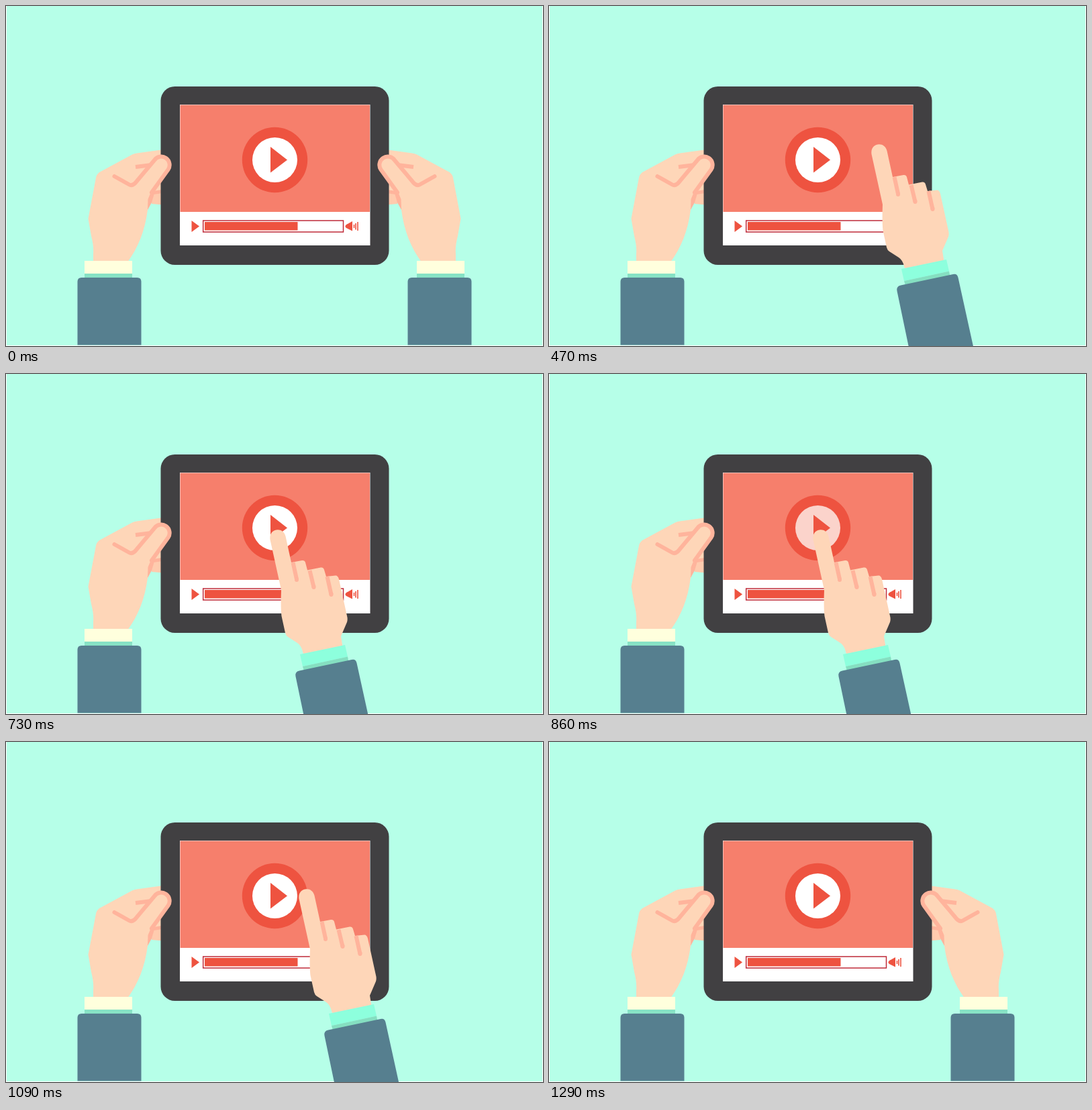
Recreate the animation shown at these times as an HTML page. Size 800 by 507 pixels, loop 1460 ms.

```html
<!DOCTYPE html>
<html lang="en">
<head>
<meta charset="utf-8">
<title>Tablet tap</title>
<style>
  html, body { margin: 0; width: 100%; height: 100%; overflow: hidden; background: #fff; }
  svg { display: block; width: 100%; height: 100%; }
  .skin { fill: #fed6b8; }
  .crease { fill: none; stroke: #ffb49c; stroke-width: 6; stroke-linecap: round; stroke-linejoin: round; }
  .sleeve { fill: #567f8f; }
  .red { fill: #ee5340; }
  #tap { visibility: hidden; }
</style>
</head>
<body>
<svg viewBox="0 0 800 507">
  <defs>
    <g id="palm">
      <path fill="#ffcbae" d="M212 268 H240 V297 L217 295 Z"/>
      <path class="skin" d="M130 382 L130 370 Q131 358 127 343 L122.500 317 L134 256 Q135 251 139 248 L188 221.500 Q191 220 195 219.500 L231 214.500 H240 V270 L217 280 L211 304 C207 335 197 360 181 382 Z"/>
      <path class="crease" stroke-width="5" style="stroke-linecap:butt" d="M193 240 L217 237"/>
      <path class="crease" style="stroke-width:5;stroke-linecap:butt" d="M216 279 L236 276"/>
      <path fill="#ffb49c" d="M219 270 L211.500 288 L211 304 L217 293 L222 276 Z"/>
      <path fill="#ffffdd" d="M117 380 H188 V399 H117 Z"/>
      <path fill="#87e2c5" d="M117 399 H188 V405 H117 Z"/>
      <path class="sleeve" d="M106.500 505.500 V411 Q106.500 405 112.500 405 H195.500 Q201.500 405 201.500 411 V505.500 Z"/>
    </g>
    <g id="thumb">
      <path class="skin" d="M187 268 L221 230 A11 11 0 0 1 242 244 L217 276 L205 290 Z"/>
      <path class="crease" d="M161.500 254 L183 266 Q189 269.500 195 261 L221 230 A11 11 0 0 1 241.500 244 L217 278"/>
    </g>
  </defs>

  <rect x="1" width="798" height="506" fill="#b6ffe8"/>
  <use href="#palm"/>
  <g class="grip"><use href="#palm" transform="matrix(-1 0 0 1 800 0)"/></g>

  <rect x="230.500" y="120" width="340" height="266" rx="21" fill="#414042"/>
  <rect x="259" y="147" width="283.500" height="210" fill="#fff"/>
  <rect x="259.500" y="147.500" width="282.500" height="159.500" fill="#f67f6c"/>
  <circle class="red" cx="400.500" cy="229.500" r="48.700"/>
  <circle id="dot" cx="400.500" cy="229.500" r="33.500" fill="#fff"/>
  <path class="red" d="M394 210 L419 229.500 L394 248.500 Z"/>

  <path class="red" d="M276.500 320 L288 328.500 L276.500 337 Z"/>
  <rect x="293.700" y="320" width="208.800" height="17" fill="#fff" stroke="#bf2a38" stroke-width="1.500"/>
  <rect class="red" x="296" y="322" width="138.500" height="12.500"/>
  <path class="red" d="M505.500 328.500 Q505.500 327 507 326 L516 321 V335.500 L507 331 Q505.500 330 505.500 328.500 Z"/>
  <path d="M518.500 326 V331 M521 324 V333.500 M524 322 V335" stroke="#ee5340" stroke-width="1.600"/>

  <use href="#thumb"/>
  <g class="grip"><use href="#thumb" transform="matrix(-1 0 0 1 800 0)"/></g>

  <g id="tap">
    <path class="skin" d="M526.500 199 C524 182 546 179 549.500 194 L558 233 L574 230 Q578 229.500 579 233 L582 244.500 L602 240.500 Q606 240 607 244 L610 254 L624 252.500 Q627.500 252.500 629 258 L641.500 315 Q642 319 641 322 L632 343 L635 362 L577 372 L575 366 Q573 357 567 353 L553 344 Q550 342 549 338 L543.500 313 Q542 300 543 274 Z"/>
    <path class="crease" style="stroke-linecap:butt" d="M560.500 233 L566 258 M585.500 245 L591.500 270 M611.500 254 L617.500 281"/>
    <path class="crease" d="M566 258 V259 M591.500 269 V270 M617.500 280 V281"/>
    <path fill="#8dffdd" d="M571 370 L638 356 L642 373.500 L575 388 Z"/>
    <path fill="#85dfc1" d="M575 388 L642 373.500 L643.500 381 L577 395 Z"/>
    <path class="sleeve" d="M564.500 403 Q563 396 570 394.500 L648 378 Q654 376.500 655.500 383 L691.500 547 H594.500 Z"/>
  </g>
</svg>
<script>
const LOOP = 1460;

// Steps: start time, hand offset [x, y] or null while both hands hold the tablet, pressed
const steps = [
  [0, null],
  [330, [0, 0]],
  [470, [-46, 22]],
  [600, [-90, 35]],
  [730, [-133, 48]],
  [860, [-133, 48], true],
  [990, [-133, 48]],
  [1090, [-90, 35]],
  [1190, [-46, 22]],
  [1290, null]
];

const show = on => on ? 'visible' : 'hidden';

function play(el, pose) {
  const frames = steps.map(([at, pos, down]) =>
    ({ offset: at / LOOP, easing: 'step-end', ...pose(pos, down) }));
  frames.push({ ...frames[frames.length - 1], offset: 1 });
  el.animate(frames, { duration: LOOP, iterations: Infinity });
}

play(document.getElementById('tap'), pos => {
  const [x, y] = pos || [0, 0];
  return { visibility: show(pos), transform: `translate(${x}px, ${y}px)` };
});
play(document.getElementById('dot'), (pos, down) => ({ fill: down ? '#fbd3cb' : '#ffffff' }));
document.querySelectorAll('.grip').forEach(el => play(el, pos => ({ visibility: show(!pos) })));
</script>
</body>
</html>
```
